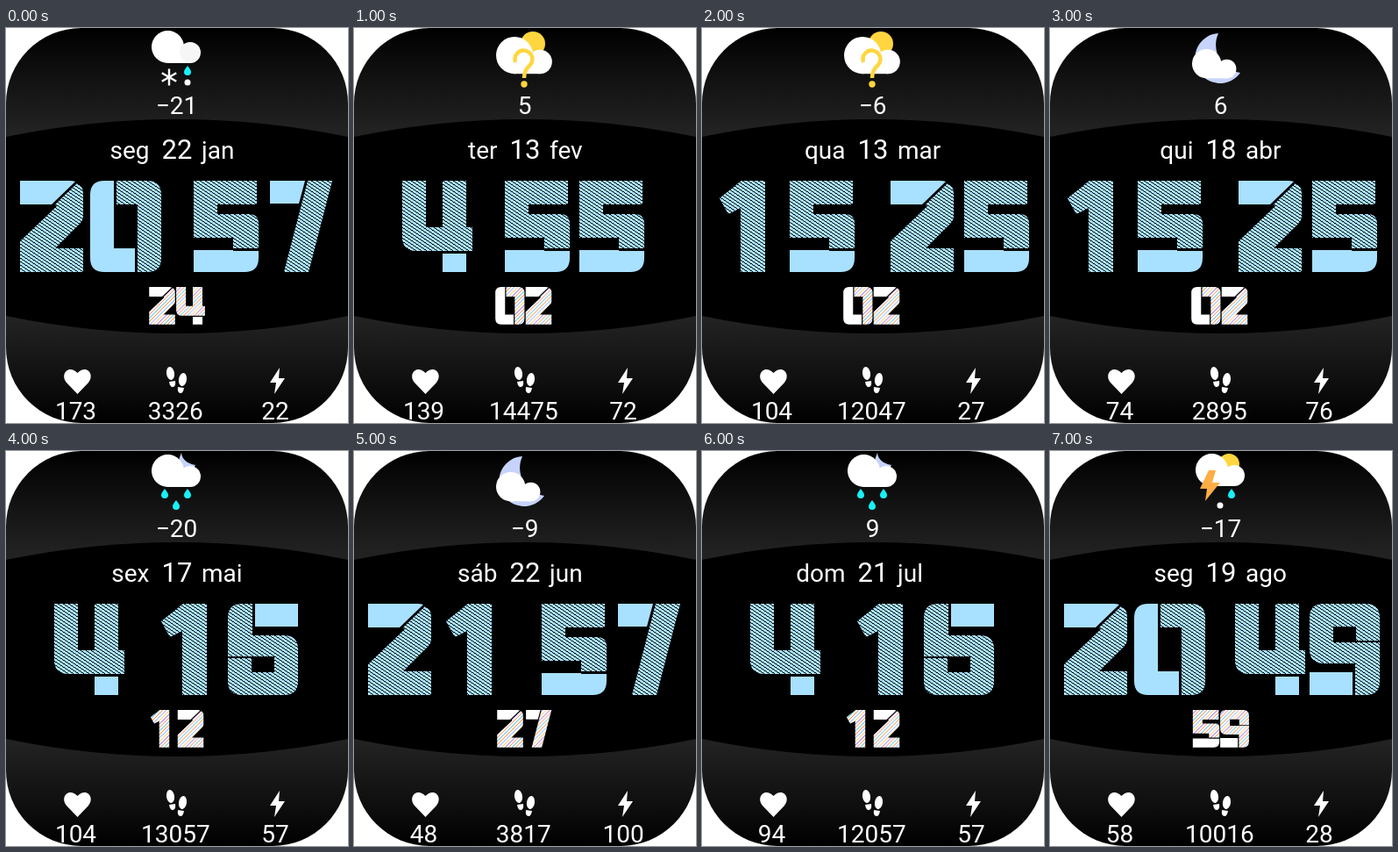
Recreate the animation shown at these times as an HTML page with a canvas. Size 390x450 px, loop 8 s.

```html
<!DOCTYPE html>
<html lang="pt">
<head>
<meta charset="utf-8">
<style>
html, body { margin: 0; width: 100%; height: 100%; overflow: hidden; background: #fff; }
canvas { display: block; }
</style>
</head>
<body>
<canvas id="face" width="390" height="450"></canvas>
<script>
const ctx = document.getElementById('face').getContext('2d');
const BLUE = '#a8e0ff', CYAN = '#18f0f8', SUN = '#ffd63f', MOON = '#c6d3fa';

// Digit outlines, 104 high, around x = 0: plain part and hatched part.
const glyphs = {
  0: ['M-14 0H-25Q-41 0-41 16V88Q-41 104-25 104H10V77H-14Z',
      'M-11 0H24Q40 0 40 16V88Q40 104 24 104H13V27H-11Z'],
  1: ['', 'M-32 20L-7 0H20V104H-8V31L-22 38Z'],
  2: ['M-36 0H20Q25 0 27 1L0 27H-36Z',
      'M29 3Q36 6 36 14V40Q36 45 32 49L4 77H36V104H-36V69L6 29L4 27Z'],
  4: ['M6 83H33V104H6Z',
      'M-40 0H-13V53H6V0H33V53H40V80H-24Q-40 80-40 64Z'],
  5: ['M-37 79H8V80H37V88Q37 104 21 104H-37Z',
      'M-37 0H35V27H-10V38H26Q37 38 37 49V77H8V65H-37Z'],
  6: ['M-10 0H39V26H-10Z',
      'M-13 0V36H23Q39 36 39 52V88Q39 104 23 104H-25Q-41 104-41 88V62H-14V78H12V60H-41V16Q-41 0-25 0Z'],
  7: ['M-35 0H5L-2 26H-35Z', 'M8 0H36L9 104H-19Z']
};
for (const d in glyphs) glyphs[d] = glyphs[d].map(p => new Path2D(p));
const turn = new DOMMatrix([-1, 0, 0, -1, -1, 104]);
glyphs[9] = glyphs[6].map(p => {
  const turned = new Path2D();
  turned.addPath(p, turn);
  return turned;
});

function tile(w, h, base, paint) {
  const c = document.createElement('canvas');
  c.width = w;
  c.height = h;
  const g = c.getContext('2d');
  g.fillStyle = base;
  g.fillRect(0, 0, w, h);
  paint(g);
  return ctx.createPattern(c, 'repeat');
}

// Dotted lines falling to the right, two rows for every three columns.
const hatch = tile(6, 4, BLUE, g => {
  g.fillStyle = '#000';
  for (let y = 0; y < 4; y++) g.fillRect(Math.ceil(y * 1.5), y, 2 - y % 2, 1);
});

const rainbow = tile(24, 24, '#fff', g => {
  ['#f08a3c', '#86b4ff', '#ffc45c', '#a56ac8', '#f2906c', '#58bccb'].forEach((color, i) => {
    g.fillStyle = color;
    for (let y = 0; y < 24; y++) g.fillRect((i * 4 + 24 - y) % 24, y, 1, 1);
  });
});

function digit(d, x, y, scale, plain, pattern) {
  ctx.save();
  ctx.translate(x, y);
  ctx.scale(scale, scale);
  const [solid, lined] = glyphs[d];
  ctx.fillStyle = plain;
  ctx.fill(solid);
  ctx.clip(lined);
  ctx.scale(1 / scale, 1 / scale);
  ctx.fillStyle = pattern;
  ctx.fillRect(-50, 0, 100, 105);
  ctx.restore();
}

function shape(path, color) {
  ctx.fillStyle = color;
  ctx.fill(new Path2D(path));
}

function oval(x, y, rx, ry, color, angle = 0) {
  ctx.fillStyle = color;
  ctx.beginPath();
  ctx.ellipse(x, y, rx, ry, angle, 0, 7);
  ctx.fill();
}

const dot = (x, y, r, color) => oval(x, y, r, r, color);

function drop(x, y) {
  shape(`M${x} ${y - 6}Q${x + 4} ${y - 1} ${x + 4} ${y + 1}A4 4 0 0 1 ${x - 4} ${y + 1}Q${x - 4} ${y - 1} ${x} ${y - 6}Z`, CYAN);
}

function cloud(x, y, s = 1) {
  ctx.save();
  ctx.translate(x, y);
  ctx.scale(s, s);
  dot(18.5, 18.5, 18.5, '#fff');
  dot(44, 25, 12, '#fff');
  ctx.fillRect(18, 20, 26, 17);
  ctx.restore();
}

const icons = {
  sleet() {
    cloud(166, 3);
    dot(209, 28, 11, '#f6f6f7');
    ctx.strokeStyle = '#fff';
    ctx.lineWidth = 2.4;
    for (let i = 0; i < 3; i++) {
      const a = Math.PI / 2 + i * Math.PI / 3, dx = 9.5 * Math.cos(a), dy = 9.5 * Math.sin(a);
      ctx.beginPath();
      ctx.moveTo(186 - dx, 56 - dy);
      ctx.lineTo(186 + dx, 56 + dy);
      ctx.stroke();
    }
    drop(207, 49);
    dot(207, 62, 3.5, '#fff');
  },
  unknown() {
    dot(204, 18, 14, SUN);
    cloud(162, 10, 1.14);
    ctx.strokeStyle = SUN;
    ctx.lineWidth = 4.5;
    ctx.stroke(new Path2D('M184 39A10 10 0 1 1 200 43Q194 48 194 57'));
    dot(194, 64, 3.7, SUN);
  },
  night() {
    shape('M192 6A28.5 28.5 0 1 0 217 51A32 32 0 0 1 192 6Z', MOON);
    cloud(162, 24, 0.9);
  },
  rain() {
    shape('M200 2Q201 13 216 16Q212 27 201 24Q194 14 200 2Z', MOON);
    cloud(166, 4);
    drop(181, 49);
    drop(207, 49);
    drop(194, 62);
  },
  storm() {
    dot(204, 15, 12, SUN);
    cloud(166, 3);
    shape('M181 22L171 43H179L177 57L194 36H185L189 22Z', '#ffad45');
    drop(207, 49);
    dot(194, 62, 3.5, '#fff');
  }
};

const states = [
  { icon: 'sleet', temp: '−21', date: 'seg 22 jan', hour: '20', min: '57', sec: '24', stats: [173, 3326, 22] },
  { icon: 'unknown', temp: '5', date: 'ter 13 fev', hour: '4', min: '55', sec: '02', stats: [139, 14475, 72] },
  { icon: 'unknown', temp: '−6', date: 'qua 13 mar', hour: '15', min: '25', sec: '02', stats: [104, 12047, 27] },
  { icon: 'night', temp: '6', date: 'qui 18 abr', hour: '15', min: '25', sec: '02', stats: [74, 2895, 76] },
  { icon: 'rain', temp: '−20', date: 'sex 17 mai', hour: '4', min: '16', sec: '12', stats: [104, 13057, 57] },
  { icon: 'night', temp: '−9', date: 'sáb 22 jun', hour: '21', min: '57', sec: '27', stats: [48, 3817, 100] },
  { icon: 'rain', temp: '9', date: 'dom 21 jul', hour: '4', min: '16', sec: '12', stats: [94, 12057, 57] },
  { icon: 'storm', temp: '−17', date: 'seg 19 ago', hour: '20', min: '49', sec: '59', stats: [58, 10016, 28] }
];

function text(value, x, y, align = 'center', size = 28) {
  ctx.font = `${size}px Roboto, sans-serif`;
  ctx.textAlign = align;
  ctx.fillStyle = '#fff';
  ctx.fillText(value, x, y);
}

function background() {
  const shade = ctx.createLinearGradient(0, 0, 0, 450);
  shade.addColorStop(0, '#000');
  shade.addColorStop(0.1, '#0e0e0e');
  shade.addColorStop(0.26, '#222');
  shade.addColorStop(0.74, '#222');
  shade.addColorStop(0.9, '#0e0e0e');
  shade.addColorStop(1, '#000');
  ctx.fillStyle = shade;
  ctx.fillRect(0, 0, 390, 450);
  shape('M0 124Q195 84 390 124V328Q195 368 0 328Z', '#000');
}

function statIcons() {
  shape('M81.5 417L69 404C61 394 72 383 81.5 393C91 383 102 394 94 404Z', '#fff');
  oval(187.5, 393.5, 4.5, 7.5, '#fff', -0.15);
  shape('M186 403L193 402Q194 409 190 409Q187 409 186 403Z', '#fff');
  oval(201.5, 400.5, 4.5, 7.5, '#fff', 0.15);
  shape('M196 409L203 410Q202 416 199 416Q195 416 196 409Z', '#fff');
  shape('M312 387L301 404H308L306 417L318 399H311Z', '#fff');
}

function draw(state) {
  ctx.clearRect(0, 0, 390, 450);
  ctx.save();
  ctx.beginPath();
  ctx.roundRect(0, 0, 390, 450, 86);
  ctx.clip();
  background();
  icons[state.icon]();
  text(state.temp, 194.5, 98);

  const [week, day, month] = state.date.split(' ');
  text(week, 163.5, 149, 'right');
  text(day, 195, 149, 'center', 31);
  text(month, 223, 149, 'left');

  const slots = state.hour.length > 1 ? [52, 137, 251, 336] : [95, 209, 294];
  [...state.hour + state.min].forEach((d, i) => digit(d, slots[i], 174, 1, BLUE, hatch));
  [...state.sec].forEach((d, i) => digit(d, 178 + 32.5 * i, 295, 0.41, '#fff', rainbow));

  statIcons();
  state.stats.forEach((n, i) => text(n, 79.5 + 113.8 * i, 446));
  ctx.restore();
}

function tick() {
  draw(states[Math.floor(performance.now() % 8000 / 1000)]);
  requestAnimationFrame(tick);
}
tick();
</script>
</body>
</html>
```
